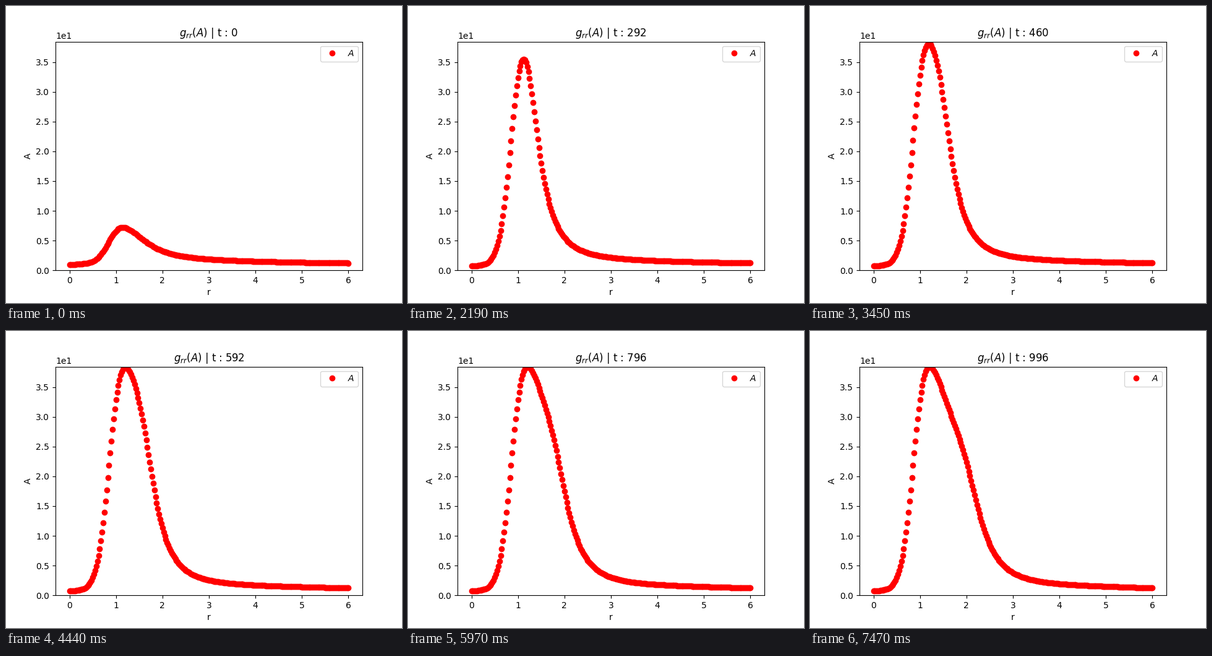
A matplotlib script for the animation above (7500 ms loop, 640 by 480 pixels).

```python
import numpy as np
import matplotlib.pyplot as plt
from matplotlib.animation import FuncAnimation

FRAMES, INTERVAL, STEP = 250, 30, 4

r = np.linspace(0, 6, 241)


def frozen_profile():
    """Height above the floor that every point finally settles at."""
    u = r - 1
    d = np.minimum(u, 0)
    rise = .348 + 7.05 * u - 1.84 * d**2 + 2.635 * d**3
    return 55.5 * np.hypot(r, .15) ** -1.2 / (1 + np.exp(-rise))


FROZEN = frozen_profile()
HUMP = .1 / (1 + (r / 1.75) ** 6) + .012 / np.maximum(r, .1) ** 3
SOFT_R = np.hypot(r, .6)
EDGE = 1 - (r / 6) ** 6  # the outer boundary hardly drifts


def profile(i):
    """A(r): an outward front lifts the initial hump to the frozen profile."""
    fade = np.exp(-(i / 20) ** 2)
    radius = 1.2 * (1 - np.exp(-i / 27.5)) + .0039 * i
    power = 6.5 - 3.6 * np.exp(-i / 65)
    growth = (.072 + 1e-4 * i * EDGE + fade * HUMP
              + (radius / SOFT_R) ** power)
    share = (1 + growth ** -3) ** (-1 / 3)
    floor = .75 + .2 * fade * np.exp(-r**2)
    return floor + FROZEN * share


fig, ax = plt.subplots(figsize=(6.4, 4.8), dpi=100)
line, = ax.plot(r, profile(0), "ro", label="$A$")
ax.set_ylim(0, 38.44)
ax.set_xlabel("r")
ax.set_ylabel("A")
ax.ticklabel_format(axis="y", style="sci", scilimits=(0, 0))
ax.legend(loc="upper right")
title = ax.set_title("")


def update(i):
    line.set_ydata(profile(i))
    title.set_text(f"$g_{{rr}}(A)$ | t : {i * STEP}")
    return line, title


anim = FuncAnimation(fig, update, frames=FRAMES, interval=INTERVAL, repeat=True)
plt.show()
```
